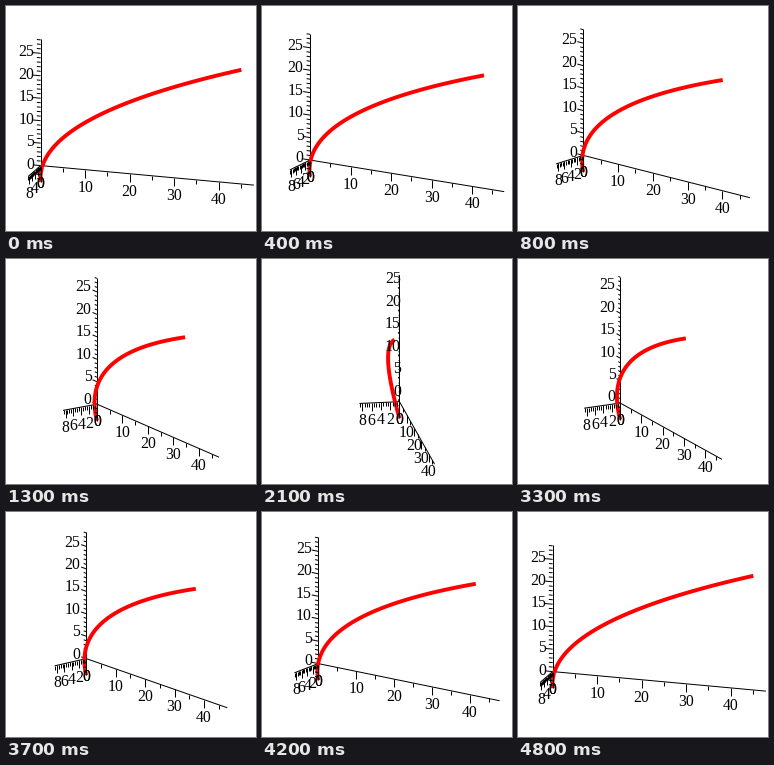
A matplotlib script that plays this animation: 250x225 px, repeating every 4900 ms.

```python
import numpy as np
import matplotlib.pyplot as plt
from matplotlib.animation import FuncAnimation
from matplotlib.collections import LineCollection

W, H, DPI = 250, 225, 100
PT = 72 / DPI                       # points per pixel
SCALE, TILT = 4.68, 0.282           # pixels per unit, sine of the elevation
LIFT = np.sqrt(1 - TILT ** 2)
CENTER = np.array([135, 120])
STEPS = 24                          # turn of 3 degrees each, then back

LOW = np.array([0, 0, -3.7])
HIGH = np.array([47.9, 8.65, 28.1])
MIDDLE = (LOW + HIGH) / 2

fig = plt.figure(figsize=(W / DPI, H / DPI), dpi=DPI, facecolor="white")
ax = fig.add_axes([0, 0, 1, 1])
ax.set_xlim(0, W)
ax.set_ylim(H, 0)
ax.axis("off")

s = np.linspace(0, 1, 120)[:, None]
curve = LOW + (HIGH - LOW) * np.hstack([s ** 2, s, s])
SPLIT = 14                          # the part below z = 0 lies behind the axis


def red_line(z):
    return ax.plot([], [], color="red", lw=3.9 * PT, zorder=z,
                   solid_capstyle="butt")[0]


tail, arc = red_line(1), red_line(3)
rules = LineCollection([], colors="black", linewidths=PT, zorder=2)
ax.add_collection(rules)


def label(value, ha):
    return ax.text(0, 0, str(value), family="Liberation Serif",
                   fontsize=15.7 * PT, ha=ha, va="center", zorder=4)


def on_axis(axis, value):
    p = np.zeros(3)
    p[axis] = value
    return p


# axis, major step, minor step
AXES = [(0, 10, 5), (1, 2, 0.5), (2, 5, 1)]
LONG, SHORT = 8, 4                  # tick lengths
labels = [(axis, v, label(v, "right" if axis == 2 else "center"))
          for axis, major, _ in AXES
          for v in range(0, int(HIGH[axis]) + 1, major)]


def project(p, a):
    x, y, z = np.moveaxis(np.asarray(p) - MIDDLE, -1, 0)
    u = x * np.cos(a) - y * np.sin(a)
    v = TILT * (x * np.sin(a) + y * np.cos(a)) - LIFT * z
    return CENTER + SCALE * np.stack([u, v], axis=-1)


def draw(i):
    a = np.radians(18 + 3 * (STEPS - abs(STEPS - i)))
    pts = project(curve, a)
    tail.set_data(*pts[:SPLIT + 1].T)
    arc.set_data(*pts[SPLIT:].T)

    # ticks of the upright axis shorten with the turn, its labels do not
    back = -np.array([np.cos(a), TILT * np.sin(a)])
    out = back / np.hypot(*back)
    down = np.array([0, 1])

    segments = []
    for axis, major, minor in AXES:
        segments.append(project([on_axis(axis, LOW[axis]),
                                 on_axis(axis, HIGH[axis])], a))
        way = back if axis == 2 else down
        for v in np.arange(np.ceil(LOW[axis]), HIGH[axis], minor):
            p = project(on_axis(axis, v), a)
            size = SHORT if v % major else LONG
            segments.append([p, p + size * way])
    rules.set_segments(segments)

    crowded = 2 * SCALE * np.sin(a) < 4.5
    for axis, v, text in labels:
        x, y = project(on_axis(axis, v), a)
        if axis == 2:
            text.set_position((x + 9.3 + 16 * out[0], y + 11.5 * out[1]))
        else:
            text.set_position((x, y + 18))
        text.set_visible(not (axis == 1 and crowded and v % 4))
    return [tail, arc, rules] + [t for *_, t in labels]


anim = FuncAnimation(fig, draw, frames=2 * STEPS + 1, interval=100,
                     repeat=True, repeat_delay=0)
plt.show()
```
